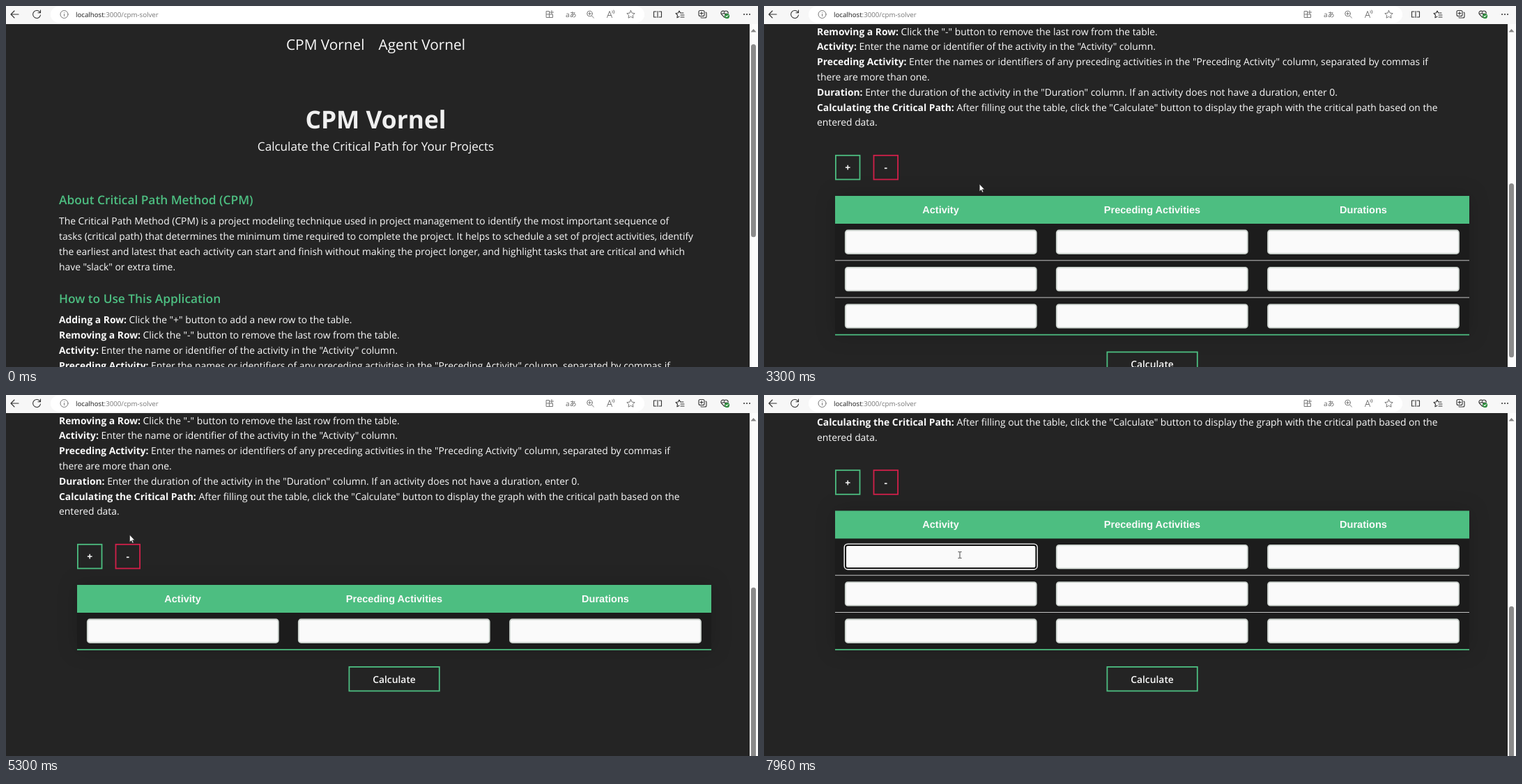
These frames come from a looping animation (1079x519 px, 8 s). An HTML page:

```html
<!DOCTYPE html>
<html lang="en">
<head>
<meta charset="utf-8">
<title>Critical path</title>
<style>
html, body { margin: 0; width: 100%; height: 100%; overflow: hidden; background: #242424; }
svg { display: block; }
text { font: 13.85px "Open Sans", sans-serif; fill: #fafafa; text-rendering: geometricPrecision; }
.b { font-weight: 700; }
.mid { text-anchor: middle; }
.nav { font-size: 20.8px; }
.title { font-size: 35.3px; font-weight: 700; fill: #f0f0f0; }
.sub { font-size: 17.1px; }
.head { font-size: 17.3px; font-weight: 600; fill: #4dbe81; }
.th { font: bold 14.54px "Liberation Sans", Arial, sans-serif; }
.calc { font-weight: 600; }
.url { font-size: 9.7px; fill: #777; }
.icons { fill: none; stroke: #333; stroke-width: 1.1; stroke-linecap: round; stroke-linejoin: round; }
.soft { stroke: #777; stroke-width: 1; }
#table { filter: drop-shadow(0 0 14px rgba(0, 0, 0, .18)); }
</style>
</head>
<body>
<svg width="1079" height="519" viewBox="0 0 1079 519">
  <rect width="1079" height="519" fill="#242424"/>
  <g id="page">
    <text class="nav" x="402" y="62.5">CPM Vornel</text>
    <text class="nav" x="534.5" y="62.5">Agent Vornel</text>
    <text class="title mid" x="530.5" y="176">CPM Vornel</text>
    <text class="sub mid" x="530.5" y="208">Calculate the Critical Path for Your Projects</text>
    <text class="head" x="76" y="284.5">About Critical Path Method (CPM)</text>
    <text class="head" x="76" y="426.5">How to Use This Application</text>
    <g id="copy"></g>
    <g id="plus">
      <rect x="-17.3" y="-17.3" width="34.6" height="34.6" stroke="#4dbe81" stroke-width="1.8" fill="#4dbe81"/>
      <text class="b mid" y="5">+</text>
    </g>
    <g id="minus">
      <rect x="-17.3" y="-17.3" width="34.6" height="34.6" stroke="#d2204a" stroke-width="1.8" fill="#e61e4a"/>
      <text class="b mid" y="5">-</text>
    </g>
    <rect id="table" x="102" y="709.5" width="910" fill="#1c1c1c"/>
    <rect x="102" y="709.5" width="910" height="40" fill="#4dbe81"/>
    <text class="th mid" x="253.5" y="734.5">Activity</text>
    <text class="th mid" x="557" y="734.5">Preceding Activities</text>
    <text class="th mid" x="860" y="734.5">Durations</text>
    <g id="rows"></g>
    <g id="focus" fill="none">
      <rect x="115.2" y="757.2" width="277" height="36.6" rx="5" stroke="#fff" stroke-width="1.4"/>
      <rect x="117" y="759" width="273.4" height="33" rx="3" stroke="#101010" stroke-width="2"/>
      <path id="caret" d="M254.5 767.5v17" stroke="#111"/>
    </g>
    <g id="foot">
      <path d="M102 802.6h910" stroke="#4dbe81" stroke-width="1.8"/>
      <rect x="492.4" y="827.4" width="129.4" height="34.6" fill="none" stroke="#4dbe81" stroke-width="1.8"/>
      <text class="calc mid" x="557" y="850">Calculate</text>
    </g>
  </g>

  <rect x="1067" y="26" width="12" height="493" fill="#fcfcfc"/>
  <path d="M1068.5 37.5l4-4.5 4 4.5z" fill="#858585"/>
  <rect id="thumb" x="1069" width="7" rx="3.5" fill="#8b8b8b"/>

  <rect width="1079" height="26" fill="#f7f7f7"/>
  <rect x="64" y="0.5" width="852" height="23.5" rx="11.7" fill="#fff"/>
  <text class="url" x="100" y="15.8"><tspan fill="#1c1c1c">localhost</tspan>:3000/cpm-solver</text>
  <g class="icons">
    <path d="M18 12H7m5-5-5 5 5 5M49 9.5A5.5 5.5 0 1 0 49.5 13M49.5 6v3.7H46"/>
    <path d="M935 7.5v9M933 8h-3.5v8h3.5M937 8h3.5v8H937"/>
    <path d="M966 7l1.6 3h4.4M966 7l-1.6 3-3.4.5 2.5 2.5-.6 3.8 3-1.6M968 13h5M968 16h5"/>
    <rect x="994" y="6.5" width="8" height="8" rx="2"/>
    <path d="M1004 9v0q1 0 1 1v5q0 2-2 2h-5q-1 0-1-.8M998 8.5v4m-2-2h4"/>
    <path d="M1031 16.5l-4.3-4.3a3 3 0 0 1 4.3-4.2 3 3 0 0 1 5 3M1027 11h2.5l1-1.5 1.5 3 1-1.5h1"/>
    <circle cx="1034.5" cy="14.5" r="3.6" fill="#2c8a3c" stroke="none"/>
    <path d="M1033 14.5l1.2 1.2 2-2.2" stroke="#fff"/>
    <path d="M1059 12h.1M1063 12h.1M1067 12h.1" stroke-width="1.9"/>
  </g>
  <g class="icons soft">
    <circle cx="83.5" cy="12" r="5.5"/><path d="M83.5 11.5v3M83.5 9.2v.1"/>
    <path d="M775.5 7.5h4v9h-4zM775.5 12h9v4.5h-5M783 6.5v5m-2.5-2.5h5"/>
    <circle cx="837.5" cy="11" r="3.8"/><path d="M840.4 14l3 3M835.7 11h3.6M837.5 9.2v3.6"/>
    <path d="M862.5 16.5l3.5-9 3.5 9M863.7 13.5h4.6M870 7q1.3 1.5 0 3M872 6q2 2.500 0 5"/>
    <path d="M896.500 6.500l1.700 3.600 4 .5-2.900 2.700.7 3.900-3.500-1.900-3.500 1.900.7-3.900-2.900-2.700 4-.5z"/>
  </g>
  <text x="803" y="15.5" style="font:10px 'Open Sans','Noto Sans CJK JP',sans-serif;fill:#666">aあ</text>

  <circle id="ripple" r="7" fill="#f28c1e"/>
  <g id="cursor">
    <path id="arrow" d="M0 0v10.500l2.400-2.200 1.700 3.700 1.600-.7-1.700-3.600h3.200z" fill="#fff" stroke="#222" stroke-width=".6"/>
    <path id="hand" d="M-1 0q1-1.300 2 0v4.500l4.300 1q1.200.4 1 1.700l-.8 3.800-.9 2H-.6l-3-4.200q-.6-1.300.6-1.400l2 1.300z" fill="#fff" stroke="#222" stroke-width=".7"/>
    <path id="beam" d="M-2.500-4.500h2l.5.5.5-.5h2M0-4v8M-2.500 4.500h2L0 4l.5.5h2" fill="none"/>
  </g>
</svg>
<script>
const $ = id => document.getElementById(id);
const clamp = v => Math.max(0, Math.min(1, v));
const show = (id, on) => { $(id).style.display = on ? '' : 'none'; };
const ROW = 53.3, LEAD = 21.8, LOOP = 8000;

const about = [
  'The Critical Path Method (CPM) is a project modeling technique used in project management to identify the most important sequence of',
  'tasks (critical path) that determines the minimum time required to complete the project. It helps to schedule a set of project activities, identify',
  'the earliest and latest that each activity can start and finish without making the project longer, and highlight tasks that are critical and which',
  'have "slack" or extra time.'
];
const usage = [
  'Adding a Row:| Click the "+" button to add a new row to the table.',
  'Removing a Row:| Click the "-" button to remove the last row from the table.',
  'Activity:| Enter the name or identifier of the activity in the "Activity" column.',
  'Preceding Activity:| Enter the names or identifiers of any preceding activities in the "Preceding Activity" column, separated by commas if',
  'there are more than one.',
  'Duration:| Enter the duration of the activity in the "Duration" column. If an activity does not have a duration, enter 0.',
  'Calculating the Critical Path:| After filling out the table, click the "Calculate" button to display the graph with the critical path based on the',
  'entered data.'
];
const paragraph = (lines, y) => lines.map((line, i) =>
  `<text x="76" y="${y + i * LEAD}">${line.replace(/^(.*)\|/, '<tspan class="b">$1</tspan>')}</text>`).join('');
$('copy').innerHTML = paragraph(about, 314.3) + paragraph(usage, 456.3);

const field = x => `<rect x="${x}" y="759" width="274" height="33.500" rx="3.500" fill="#fafafa" stroke="#ccd3ce" stroke-width="1.800"/>`;
$('rows').innerHTML = [0, 1, 2, 3].map(i => `<g transform="translate(0 ${i * ROW})">
  ${[116.8, 419.8, 723].map(field).join('')}<path d="M102 802.300h910" stroke="#c4c4c4"/></g>`).join('');

// [time, row count]
const rowSteps = [[0, 1], [2430, 2], [2710, 3], [4080, 4], [4570, 3], [4710, 2], [5110, 1], [5950, 2], [6270, 3]];
// [start, end, scroll offset]
const scrolls = [[860, 1070, 292], [1390, 1600, 436.5], [3430, 3640, 509.5], [5110, 5111, 436.5], [6670, 6880, 543.1]];
const hovers = {
  plus: [[2290, 3150], [3780, 4220], [5720, 6640]],
  minus: [[4300, 5110]]
};
// [time, x, y]
const path = [
  [190, 1012, 505], [400, 788, 316], [1390, 788, 316], [1870, 616, 310], [2150, 250, 262], [2290, 124, 238],
  [2360, 121, 237], [3130, 121, 237], [3300, 309, 256], [3430, 335, 262], [3640, 335, 262], [3780, 135, 166],
  [3920, 121, 163], [4200, 122, 163], [4300, 162, 172], [4360, 172.5, 174], [5110, 172.5, 174], [5400, 180, 215],
  [5720, 126, 234], [5790, 121, 237], [6640, 121, 237], [6950, 255, 236], [7150, 281, 230]
];

function cursorAt(t) {
  const i = path.findIndex(p => p[0] > t);
  if (i < 0) return path[path.length - 1].slice(1);
  if (i === 0) return null;
  const [t0, x0, y0] = path[i - 1], [t1, x1, y1] = path[i];
  const k = (t - t0) / (t1 - t0);
  return [x0 + (x1 - x0) * k, y0 + (y1 - y0) * k];
}

function scrollAt(t, limit) {
  let y = 0;
  for (const [a, b, to] of scrolls) y += (to - y) * (1 - (1 - clamp((t - a) / (b - a))) ** 2);
  return Math.min(y, limit);
}

function button(id, x, t) {
  const k = hovers[id].reduce((s, [a, b]) => s + clamp((t - a) / 150) - clamp((t - b) / 150), 0);
  $(id).setAttribute('transform', `translate(${x} 668.6) scale(${1 + 0.11 * k})`);
  $(id).firstElementChild.setAttribute('fill-opacity', k);
}

function draw() {
  const t = performance.now() % LOOP;
  const n = rowSteps.filter(s => s[0] <= t).pop()[1];
  const extra = (n - 1) * ROW;
  const scroll = scrollAt(t, 436.5 + extra);
  const ratio = 499 / (982.5 + extra);

  $('page').setAttribute('transform', `translate(0 ${-scroll})`);
  [...$('rows').children].forEach((row, i) => {
    row.style.display = i < n ? '' : 'none';
    row.lastElementChild.style.display = i < n - 1 ? '' : 'none';
  });
  $('table').setAttribute('height', 40 + n * ROW);
  $('foot').setAttribute('transform', `translate(0 ${extra})`);
  $('thumb').setAttribute('y', 55 + scroll * ratio);
  $('thumb').setAttribute('height', 546 * ratio);
  button('plus', 120.2, t);
  button('minus', 174.8, t);
  show('focus', t >= 7480);
  show('caret', t < 7960);

  const pos = cursorAt(t);
  const clicks = [...rowSteps.slice(1).map(s => s[0]), 7480];
  show('cursor', pos);
  show('ripple', clicks.some(c => t >= c - 75 && t < c + 60));
  if (pos) {
    const place = `translate(${pos})`;
    $('cursor').setAttribute('transform', place);
    $('ripple').setAttribute('transform', place);
    const hand = Object.values(hovers).flat().some(([a, b]) => t >= a && t < b);
    const beam = t < 1460 || t > 6980;
    show('hand', hand);
    show('beam', beam);
    show('arrow', !hand && !beam);
    $('beam').setAttribute('stroke', t < 2000 ? '#c8c8c8' : '#444');
  }
  requestAnimationFrame(draw);
}
draw();
</script>
</body>
</html>
```
